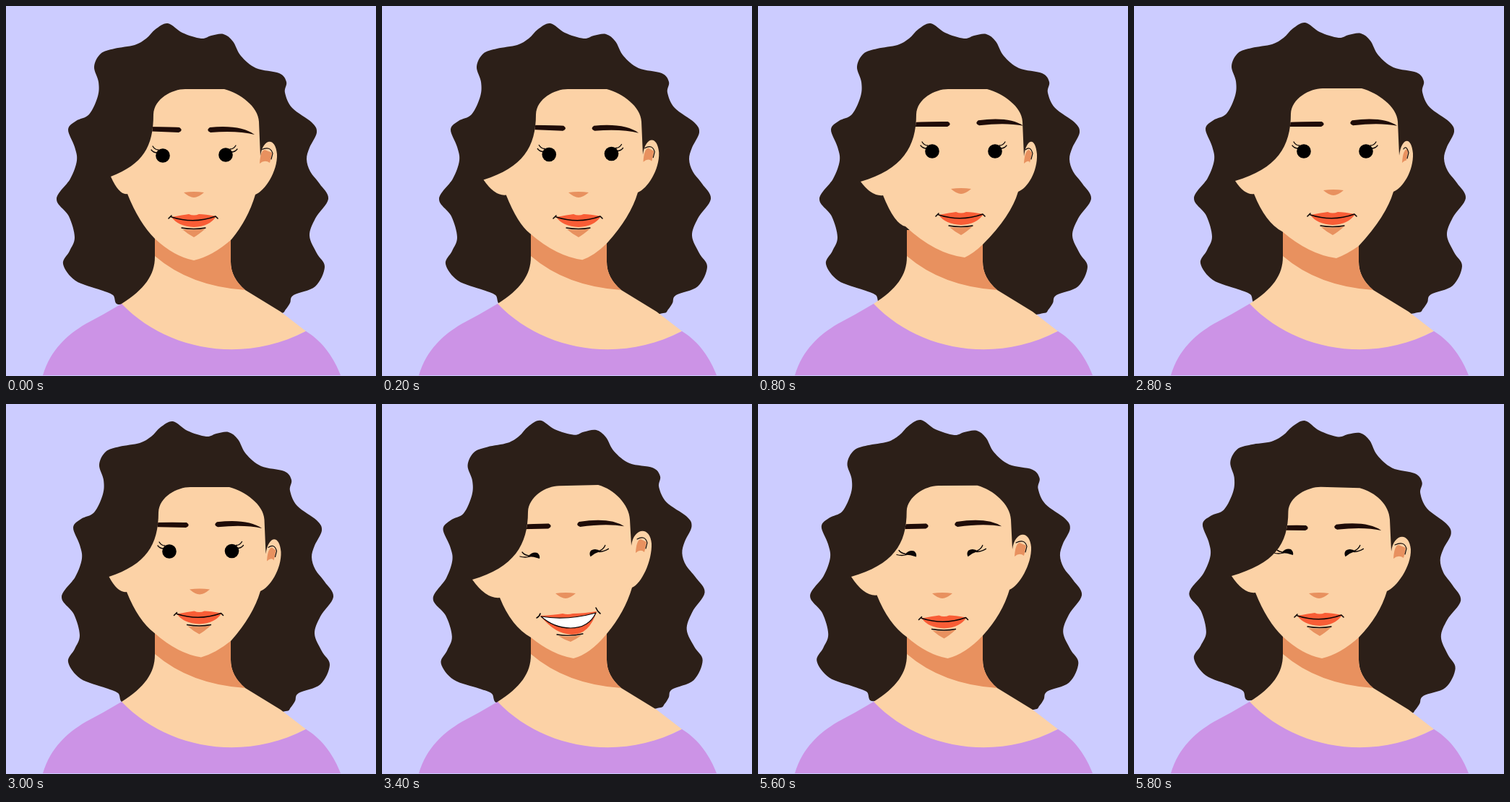
Recreate the animation shown at these times as an HTML page with a canvas. Size 512x512 px, loop 6 s.

```html
<!DOCTYPE html>
<html lang="en">
<head>
<meta charset="utf-8">
<title>Portrait</title>
<style>
html, body { margin: 0; width: 100%; height: 100%; overflow: hidden; background: #ccccff; }
canvas { display: block; width: 100vw; height: 100vh; }
</style>
</head>
<body>
<canvas id="stage" width="512" height="512"></canvas>
<script>
const ctx = document.getElementById('stage').getContext('2d');
const SKIN = '#fcd2a6', SHADE = '#e8915f', HAIR = '#2c1f18', BROW = '#1f0c08', LIPS = '#f95d36', INK = '#0b0606';

// Outer contour of the hair, clockwise from the top curl.
const HAIR_POINTS = [
  [224, 24], [244, 37], [270, 45], [284, 41], [301, 39], [314, 49], [325, 69], [346, 86],
  [378, 93], [388, 105], [386, 120], [396, 141], [423, 161], [430, 175], [420, 196], [416, 212],
  [421, 229], [434, 246], [446, 267], [428, 294], [420, 318], [430, 342], [441, 361], [428, 388],
  [398, 400], [393, 411], [387, 420], [380, 425], [350, 422], [270, 370], [200, 398], [157, 413],
  [148, 400], [131, 393], [96, 380], [79, 357], [88, 339], [95, 320], [87, 291], [70, 267],
  [89, 239], [98, 214], [95, 195], [86, 171], [97, 159], [115, 150], [127, 125], [128, 105],
  [122, 84], [131, 66], [150, 59], [178, 54], [194, 45], [207, 32]
];

const NECK = new Path2D('M206 310V347C206 372 192 392 160 412L200 470L330 490L415 450L380 423L331 393Q311 376 311 354V310Z');
const NECK_SHADE = new Path2D('M206 310V346Q255 388 331 393Q311 376 311 354V310Z');
const SHIRT = new Path2D('M51 511C62 475 85 455 110 440Q135 427 160 412C220 475 325 497 415 450C440 465 455 490 463 511Z');

const BROW_LEFT = new Path2D('M190 167Q225 167 240 168Q246 172 239 175Q215 174 190 173Z');
const BROW_RIGHT = new Path2D('M282 168Q325 164 344 178Q320 172 283 175Q276 172 282 168Z');
const LASHES = new Path2D('M-8 -4Q-13 -4 -16 -8M-6 -8Q-11 -8 -14 -13');
const LID = new Path2D('M-8 1Q-2 -6 5 -4Q9 -1 8 4Q0 1 -8 1Z');
const LID_LASHES = new Path2D('M-5 1Q-12 3 -19 1M-7 0Q-13 -1 -16 -5');
const NOSE = new Path2D('M-14 -2Q0 -4 14 -2Q6 5 0 5Q-6 5 -14 -2Z');

const CALM = {
  lips: new Path2D('M-31 -4Q-15 -7 -7 -8Q0 -5 7 -8Q15 -8 31 -5Q22 9 0 10Q-22 9 -31 -4Z'),
  line: new Path2D('M-35 -2L-31 -6M-31 -4Q0 6 30 -5L33 -2'),
  chin: new Path2D('M-16 13Q0 15 16 12Q7 20 0 24Q-8 20 -16 13Z'),
  chinLine: new Path2D('M-17 11Q0 14 16 11')
};
const SMILE = {
  lips: new Path2D('M-39 -11Q-20 -12 -8 -14Q-1 -12 6 -14Q20 -14 39 -17Q29 15 5 15Q-18 15 -39 -11Z'),
  teeth: new Path2D('M-38 -10Q-2 -4 38 -15Q28 6 3 6Q-20 6 -38 -10Z'),
  line: new Path2D('M-44 -8Q-40 -10 -39 -14M38 -22Q40 -17 44 -14'),
  chin: new Path2D('M-14 17Q3 19 18 16Q10 22 3 25Q-6 22 -14 17Z'),
  chinLine: new Path2D('M-16 15Q2 18 20 14')
};

// hair: dx, dy, turn; ear: top, right, inner width; brow: dx, dy, turn; eyes: left x, y, right x, y
const front = {
  hair: [0, 0, 0], tip: [145, 236], cheek: [168, 260], neckL: [206, 322], chin: [260, 352],
  neckR: [312, 323], jaw: [345, 261], side: [350], ear: [187, 375, 24],
  brow: [0, 0, 0], eyes: [217, 207, 304, 206], nose: [260, 260], mouth: [260, 296]
};
const turned = {
  hair: [12, 0, 0], tip: [139, 242], cheek: [173, 262], neckL: [204, 312], chin: [283, 351],
  neckR: [311, 330], jaw: [357, 257], side: [362], ear: [184, 386, 21],
  brow: [15, -3, 0], eyes: [236, 205, 322, 204], nose: [276, 260], mouth: [276, 296]
};
const away = {
  hair: [15, 0, 0], tip: [142, 243], cheek: [173, 262], neckL: [204, 305], chin: [286, 348],
  neckR: [311, 330], jaw: [360, 257], side: [366], ear: [187, 386, 18],
  brow: [23, -8, -0.04], eyes: [241, 201, 328, 201], nose: [281, 255], mouth: [281, 293]
};
const returning = {
  hair: [13, -1, 0], tip: [140, 242], cheek: [166, 260], neckL: [205, 312], chin: [280, 349],
  neckR: [311, 332], jaw: [359, 257], side: [365], ear: [186, 386, 15],
  brow: [20, -8, -0.04], eyes: [235, 201, 321, 201], nose: [276, 257], mouth: [275, 293]
};
const laughing = {
  hair: [0, -2, -0.0225], tip: [125, 243], cheek: [163, 268], neckL: [206, 323], chin: [265, 352],
  neckR: [311, 318], jaw: [346, 254], side: [343], ear: [175, 373, 22],
  brow: [-9, -2.5, -0.06], eyes: [210, 210, 295, 205], nose: [254, 264], mouth: [258, 304],
  closed: true, smile: true
};
const swaying = {
  ...laughing, hair: [2, -2, -0.003], tip: [123, 240], cheek: [161, 268], jaw: [346, 255],
  side: [346], ear: [177, 373, 22], brow: [-7, -2.5, -0.06]
};
const settling = {
  hair: [7, 0, 0.027], tip: [135, 238], cheek: [168, 261], neckL: [206, 322], chin: [260, 352],
  neckR: [311, 323], jaw: [350, 259], side: [354], ear: [183, 383, 24],
  brow: [-2, 0, -0.03], eyes: [212, 205, 299, 205], nose: [256, 264], mouth: [257, 297], closed: true
};

function mix(a, b, amount, extra) {
  const pose = { ...a };
  for (const key in a) {
    if (Array.isArray(a[key])) pose[key] = a[key].map((v, i) => v + (b[key][i] - v) * amount);
  }
  return { ...pose, ...extra };
}

const TIMELINE = [
  [200, front],
  [400, mix(front, turned, 0.75)],
  [600, turned],
  [800, mix(turned, away, 0.5, { hair: away.hair })],
  [2800, away],
  [3000, returning],
  [3200, mix(returning, front, 0.5, { hair: [7, 0, 0] })],
  [3400, mix(front, settling, 0.5, { hair: [1, 0, 0], closed: true })],
  [5400, laughing],
  [5600, swaying],
  [5800, mix(settling, swaying, 0.5, { hair: swaying.hair, brow: swaying.brow })],
  [6000, settling]
];

function fill(path, color) {
  ctx.fillStyle = color;
  ctx.fill(path);
}

function stroke(path, width) {
  ctx.strokeStyle = INK;
  ctx.lineWidth = width;
  ctx.stroke(path);
}

function at(x, y, draw, { turn = 0, flip = 1 } = {}) {
  ctx.save();
  ctx.translate(x, y);
  ctx.rotate(turn);
  ctx.scale(flip, 1);
  draw();
  ctx.restore();
}

function smoothLoop(points) {
  const path = new Path2D(), n = points.length;
  const point = i => points[(i + n) % n];
  path.moveTo(...points[0]);
  for (let i = 0; i < n; i++) {
    const [a, b, c, d] = [point(i - 1), point(i), point(i + 1), point(i + 2)];
    path.bezierCurveTo(
      b[0] + (c[0] - a[0]) / 6, b[1] + (c[1] - a[1]) / 6,
      c[0] - (d[0] - b[0]) / 6, c[1] - (d[1] - b[1]) / 6, ...c);
  }
  path.closePath();
  return path;
}

function hairMover([dx, dy, turn]) {
  const cos = Math.cos(turn), sin = Math.sin(turn);
  return ([x, y]) => {
    const u = x - 258, v = y - 240;
    return [258 + dx + u * cos - v * sin, 240 + dy + u * sin + v * cos];
  };
}

function facePath(pose, move) {
  const { tip, cheek, neckL, chin, neckR, jaw } = pose;
  const [side] = pose.side, [top, right] = pose.ear;
  const part = move([204, 150]), from = move([248, 115]), to = move([302, 115]);
  const path = new Path2D();
  path.moveTo(...tip);
  path.bezierCurveTo(tip[0] + (part[0] - tip[0]) * 0.75, tip[1] - 17, part[0], 195, ...part);
  path.bezierCurveTo(part[0] + 1, 128, from[0] - 18, from[1], ...from);
  path.lineTo(...to);
  path.bezierCurveTo(to[0] + 22, to[1] + 6, side - 1, 139, side, 160);
  path.lineTo(side + 2, top + 21);
  path.bezierCurveTo(side + 5, top - 4, right - 2, top - 7, right, top + 18);
  path.bezierCurveTo(right + 1, top + 42, jaw[0] + 13, jaw[1] - 5, ...jaw);
  path.quadraticCurveTo(jaw[0] - 10, jaw[1] + 34, ...neckR);
  path.quadraticCurveTo((neckR[0] + chin[0]) / 2, chin[1] - 6, ...chin);
  path.quadraticCurveTo((neckL[0] + chin[0]) / 2, chin[1] - 5, ...neckL);
  path.quadraticCurveTo(cheek[0] + 16, cheek[1] + 40, ...cheek);
  path.quadraticCurveTo((tip[0] + cheek[0]) / 2, cheek[1] + 2, ...tip);
  path.closePath();
  return path;
}

function drawEar([top, right, width]) {
  const x = right - 7, left = right - width, y = top + 10;
  const inner = new Path2D(), fold = new Path2D();
  inner.moveTo(left, y + 21);
  inner.quadraticCurveTo(left + 1, y + 3, left + 7, y + 2);
  inner.lineTo(x, y + 6);
  inner.quadraticCurveTo(x - 1, y + 13, x - 3, y + 20);
  inner.quadraticCurveTo(left + 7, y + 15, left, y + 21);
  fold.moveTo(left + 2, y + 2);
  fold.quadraticCurveTo(x - 2, y - 4, x + 1, y + 7);
  fold.lineTo(x - 1, y + 15);
  fill(inner, SHADE);
  stroke(fold, 1.1);
}

function drawEye(x, y, closed, flip) {
  const turn = closed && flip < 0 ? -0.3 : 0;
  at(x, y, () => {
    if (closed) {
      fill(LID, INK);
      stroke(LID_LASHES, 1.3);
      return;
    }
    const ball = new Path2D();
    ball.arc(0, 0, 9.8, 0, Math.PI * 2);
    fill(ball, '#000');
    stroke(LASHES, 1.3);
  }, { turn, flip });
}

function drawBrows([dx, dy, turn]) {
  at(240 + dx, 172 + dy, () => {
    ctx.translate(-240, -172);
    fill(BROW_LEFT, BROW);
    fill(BROW_RIGHT, BROW);
  }, { turn });
}

function drawMouth([x, y], smile) {
  const mouth = smile ? SMILE : CALM;
  at(x, y, () => {
    fill(mouth.chin, SHADE);
    stroke(mouth.chinLine, 1.3);
    fill(mouth.lips, LIPS);
    if (mouth.teeth) {
      fill(mouth.teeth, '#fff');
      stroke(mouth.teeth, 1.2);
    }
    stroke(mouth.line, 1.6);
  });
}

function drawPose(pose) {
  const move = hairMover(pose.hair);
  const face = facePath(pose, move);
  ctx.fillStyle = '#ccccff';
  ctx.fillRect(0, 0, 512, 512);
  fill(smoothLoop(HAIR_POINTS.map(move)), HAIR);
  fill(NECK, SKIN);
  fill(NECK_SHADE, SHADE);
  fill(SHIRT, '#cc93e6');
  fill(face, SKIN);

  ctx.save();
  ctx.clip(face);
  const [lx, ly, rx, ry] = pose.eyes;
  drawEar(pose.ear);
  drawBrows(pose.brow);
  drawEye(lx, ly, pose.closed, 1);
  drawEye(rx, ry, pose.closed, -1);
  at(...pose.nose, () => fill(NOSE, SHADE));
  drawMouth(pose.mouth, pose.smile);
  ctx.restore();
}

ctx.lineCap = ctx.lineJoin = 'round';
const start = performance.now();

function tick() {
  const time = (performance.now() - start) % 6000;
  drawPose(TIMELINE.find(([end]) => time < end)[1]);
  requestAnimationFrame(tick);
}
tick();
</script>
</body>
</html>
```
